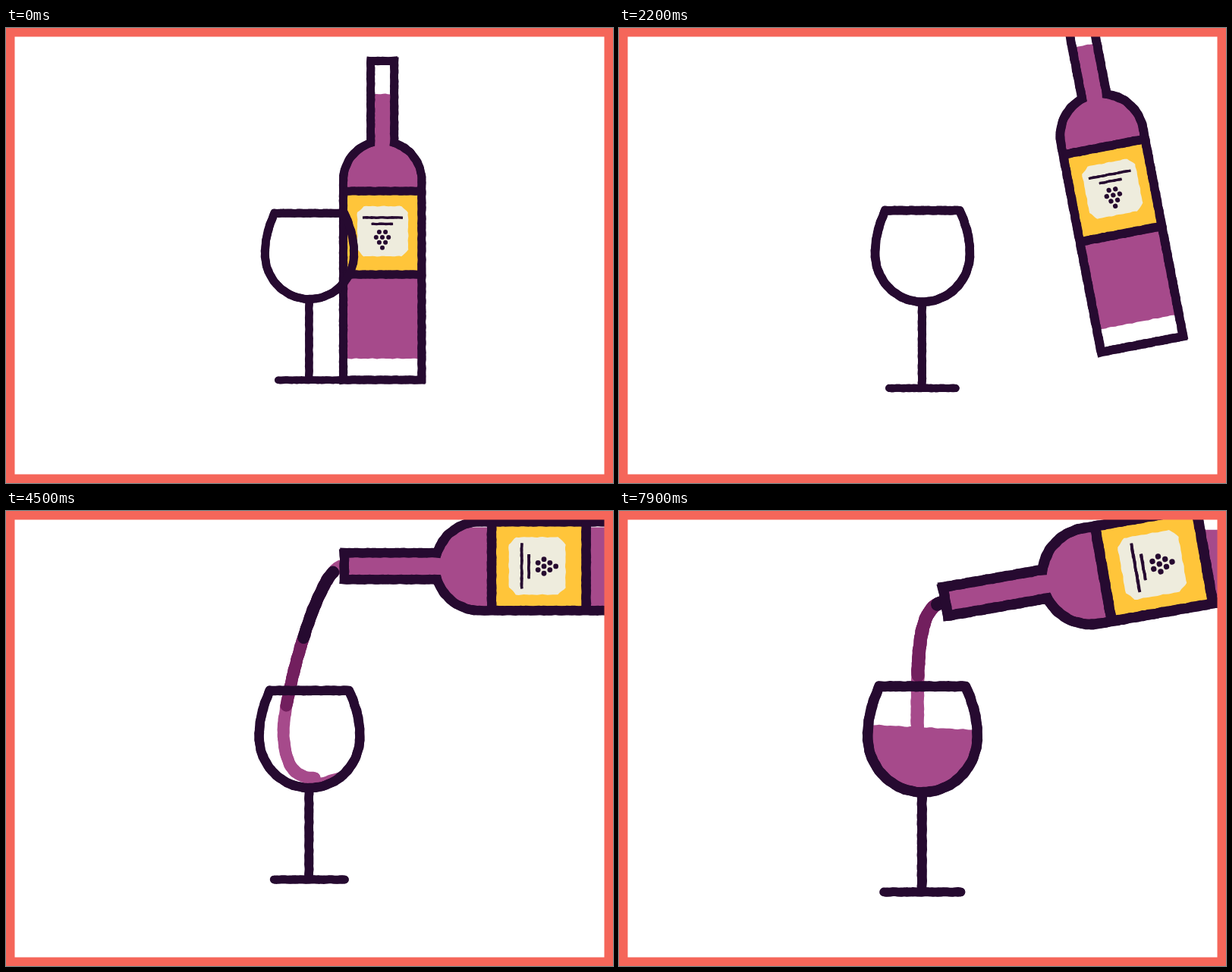
Animation, 800 px wide and 600 px high, one loop 8 s. Source, as an HTML page with a canvas:

```html
<!DOCTYPE html>
<html lang="en">
<head>
<meta charset="utf-8">
<title>Pouring wine</title>
<style>
  html, body { margin: 0; width: 100%; height: 100%; overflow: hidden; background: #fff; }
  canvas { display: block; width: 800px; height: 600px; }
</style>
</head>
<body>
<canvas id="stage" width="800" height="600"></canvas>
<script>
const ctx = document.getElementById('stage').getContext('2d');
const LOOP = 8000;
const INK = '#260a30', WINE = '#a64a8b', MID = '#721f5e';
const YELLOW = '#ffc53a', CREAM = '#eeecdd', BORDER = '#f5665a';

const lerp = (a, b, u) => a + (b - a) * u;
const progress = (t, from, to) => Math.min(1, Math.max(0, (t - from) / (to - from)));
const smooth = (t, from, to) => {
  const u = progress(t, from, to);
  return u * u * (3 - 2 * u);
};
const easeOut = (t, from, to, power) => 1 - (1 - progress(t, from, to)) ** power;

// the bottle slides clear, swings up and out, comes back level, then tips slowly
function bottlePose(t) {
  const tip = progress(t, 4500, 8000);
  return {
    x: 496 + 22 * smooth(t, 800, 1650) + 215 * smooth(t, 1750, 2600)
      - 66 * smooth(t, 2400, 3400) - 20 * tip,
    y: 270 - 170.5 * smooth(t, 1850, 2820) + 16 * tip ** 2.6,
    turn: -(90 * smooth(t, 1700, 4000) + 10 * easeOut(t, 4500, 8000, 2)) * Math.PI / 180
  };
}

function arc(cx, cy, rx, ry, from, to, steps = 32) {
  return Array.from({ length: steps + 1 }, (_, i) => {
    const a = lerp(from, to, i / steps);
    return [cx + rx * Math.cos(a), cy + ry * Math.sin(a)];
  });
}

function bezier(a, b, c, d, steps = 24) {
  return Array.from({ length: steps + 1 }, (_, i) => {
    const u = i / steps, v = 1 - u;
    return [0, 1].map(k =>
      a[k] * v ** 3 + 3 * b[k] * v * v * u + 3 * c[k] * v * u * u + d[k] * u ** 3);
  });
}

// traces a line with a slight hand-cut wobble
function trace(points, closed, seed = 0) {
  const list = closed ? [...points, points[0]] : points;
  const wave = (a, b) => 0.25 * (Math.sin(a * 0.35 + seed) + Math.sin(a * 0.57 + b * 0.1 + seed * 2));
  const put = (x, y) => ctx.lineTo(x + wave(y, x), y + wave(x, y));
  ctx.beginPath();
  for (let i = 0; i < list.length - 1; i++) {
    const [x, y] = list[i], [x2, y2] = list[i + 1];
    const n = Math.max(1, Math.round(Math.hypot(x2 - x, y2 - y) / 3));
    for (let s = 0; s < n; s++) put(lerp(x, x2, s / n), lerp(y, y2, s / n));
  }
  if (closed) ctx.closePath();
  else put(...list[list.length - 1]);
}

// two slightly different passes make the edges uneven
function stroke(points, width, { color = INK, round = false, closed = false } = {}) {
  ctx.strokeStyle = color;
  ctx.lineWidth = width - 0.3;
  ctx.lineCap = round ? 'round' : 'butt';
  ctx.lineJoin = round ? 'round' : 'miter';
  for (const seed of [0, 2.1]) {
    trace(points, closed, seed);
    ctx.stroke();
  }
}

function fill(points, color) {
  ctx.fillStyle = color;
  trace(points, true);
  ctx.fill();
}

const box = (x, y, x2, y2) => [[x, y], [x2, y], [x2, y2], [x, y2]];

function cutBox(x, y, x2, y2, cut) {
  return [[x + cut, y], [x2 - cut, y], [x2, y + cut], [x2, y2 - cut],
    [x2 - cut, y2], [x + cut, y2], [x, y2 - cut], [x, y + cut]];
}

const SHOULDER = Math.acos(0.3);
const BODY = [
  [480.7, 43.5], [511.7, 43.5],
  ...arc(496.2, 201, 51.7, 51.7, -SHOULDER, 0),
  [547.9, 464], [444.5, 464],
  ...arc(496.2, 201, 51.7, 51.7, Math.PI, Math.PI + SHOULDER)
];

const SIDE = bezier([354, 244.2], [345, 264], [341.4, 280], [341.4, 298], 12);
const BOWL = [
  ...SIDE,
  ...arc(400, 298, 58.6, 59.5, Math.PI, 0, 48),
  ...SIDE.map(([x, y]) => [800 - x, y]).reverse()
];

function placeBottle({ x, y, turn }) {
  ctx.translate(x, y);
  ctx.rotate(turn);
  ctx.translate(-496, -270);
}

function drawBottleWine(t, pose) {
  const surface = lerp(-200, 54, smooth(t, 2500, 3500)) + 24 * progress(t, 4500, 8000) ** 2;
  const neckLevel = lerp(87, 40, smooth(t, 2500, 3300));
  ctx.save();
  ctx.beginPath();
  ctx.rect(-1000, surface, 3000, 2000);
  ctx.clip();
  placeBottle(pose);
  trace(BODY, true);
  ctx.clip();
  fill(box(435, neckLevel, 560, 436), WINE);
  ctx.restore();
}

function drawBottle(pose) {
  ctx.save();
  placeBottle(pose);
  fill(box(445, 216, 548, 325), YELLOW);
  stroke(BODY, 11, { closed: true });
  for (const y of [215, 325]) stroke([[444, y], [548, y]], 11);
  fill(cutBox(463, 235, 530, 301, 8.5), CREAM);
  stroke([[470, 250], [523, 250]], 3.2);
  stroke([[482, 258.3], [510, 258.3]], 3.2);
  ctx.fillStyle = INK;
  [2, 3, 2, 1].forEach((count, row) => {
    for (let i = 0; i < count; i++) {
      ctx.beginPath();
      ctx.arc(496 + (i - (count - 1) / 2) * 8.2, 269 + row * 6.9, 3, 0, 7);
      ctx.fill();
    }
  });
  ctx.restore();
}

// the jet first swirls along the left wall, then falls straight
function streamPath(t, { x, y, turn }) {
  const swirl = 1 - smooth(t, 4500, 5500);
  const mouth = [x + 231 * Math.sin(turn), y - 231 * Math.cos(turn)];
  const fallX = lerp(394.5, 369.5, swirl);
  const wall = [fallX, 290];
  return [
    ...bezier(mouth, [mouth[0] - 26, mouth[1] + 8],
      [fallX + 3 * swirl, mouth[1] + lerp(60, 140, swirl)], wall),
    ...bezier(wall, [fallX + 1, 335], [385, 346], [406, 346]).slice(1)
  ];
}

// coloured pulses travel down the jet
function drawStream(t, pose) {
  const CAP = 7, DARK = 98, MIDDLE = 82, PERIOD = 235;
  const head = 102 + 0.388 * (t - 4500), tip = head + 200;
  if (tip <= 0) return;
  const path = streamPath(t, pose);
  let length = 0;
  const run = path.map(([x, y], i) =>
    i ? length += Math.hypot(x - path[i - 1][0], y - path[i - 1][1]) : 0);
  const pointAt = s => {
    const i = Math.max(1, run.findIndex(r => r >= s));
    const u = (s - run[i - 1]) / (run[i] - run[i - 1]);
    return [0, 1].map(k => lerp(path[i - 1][k], path[i][k], u));
  };
  const part = (from, to, color) => {
    from = Math.max(from, 0);
    to = Math.min(to, length - 0.01, tip);
    if (to <= from) return;
    const inner = path.filter((_, i) => run[i] > from && run[i] < to);
    stroke([pointAt(from), ...inner, pointAt(to)], 14, { color, round: true });
  };
  const pulses = [];
  for (let s = head; s > -PERIOD; s -= PERIOD) pulses.push(s);
  part(0, tip - CAP, WINE);
  for (const s of pulses) part(s - CAP, s + MIDDLE - CAP, MID);
  for (const s of pulses) part(s - DARK + CAP, s - CAP, INK);
}

function drawGlassWine(t) {
  const level = 362 - 74 * easeOut(t, 4200, 8000, 2.3);
  const rise = 70 * lerp(-0.29, 0.05, smooth(t, 4500, 5500));
  if (t < 4200) return;
  ctx.save();
  trace(BOWL, true);
  ctx.clip();
  fill([[330, level - rise], [470, level + rise], [470, 370], [330, 370]], WINE);
  ctx.restore();
}

function drawGlass() {
  stroke([[399.4, 358], [399.4, 464]], 10.4);
  stroke([[359, 464.3], [441, 464.3]], 9.7, { round: true });
  stroke(BOWL, 11, { round: true, closed: true });
}

function draw(t) {
  const zoom = 1 + t * 2.94e-5;
  const pose = bottlePose(t);
  ctx.fillStyle = '#fff';
  ctx.fillRect(0, 0, 800, 600);
  ctx.save();
  ctx.translate(400, 300);
  ctx.scale(zoom, zoom);
  ctx.translate(-400, -300);
  drawStream(t, pose);
  drawGlassWine(t);
  drawBottleWine(t, pose);
  drawBottle(pose);
  drawGlass();
  ctx.restore();
  ctx.lineJoin = 'miter';
  ctx.lineWidth = 23;
  ctx.strokeStyle = BORDER;
  ctx.strokeRect(0, 0, 800, 600);
}

function tick() {
  // ten pictures a second, one in five held
  let step = Math.floor(performance.now() % LOOP / 100);
  if (step % 5 === 1) step--;
  draw(step * 100);
  requestAnimationFrame(tick);
}
tick();
</script>
</body>
</html>
```
